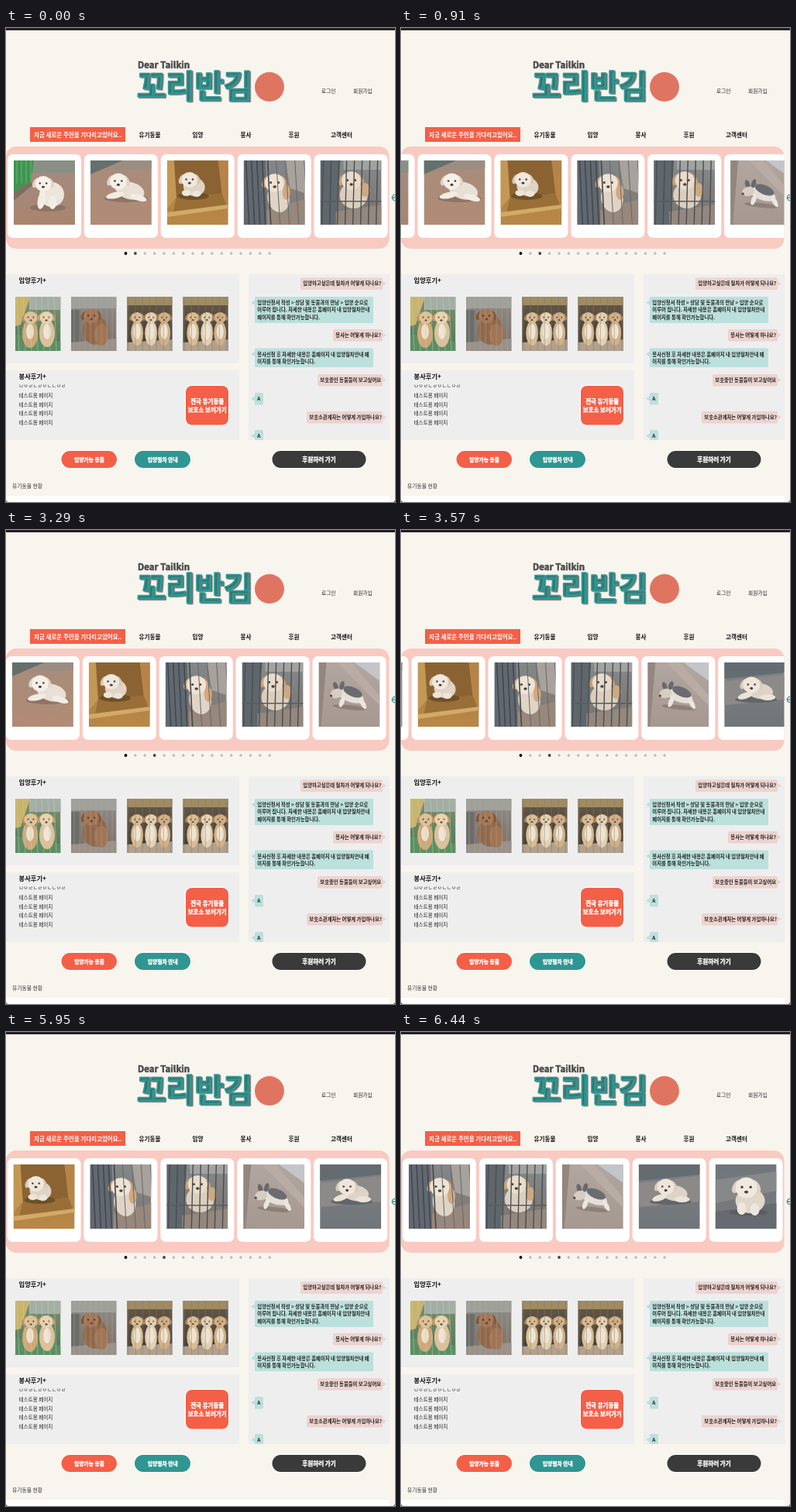
These frames come from a looping animation (502 px wide and 612 px high, 6510 ms). An HTML page with a canvas:

```html
<!DOCTYPE html>
<html lang="ko">
<head>
<meta charset="utf-8">
<style>
html, body { margin: 0; width: 100%; height: 100%; overflow: hidden; background: #f8f4ee; }
canvas { display: block; }
</style>
</head>
<body>
<canvas id="stage" width="502" height="612"></canvas>
<script>
const ctx = document.getElementById('stage').getContext('2d');
const FONT = '"Noto Sans CJK KR", "Noto Sans KR", "Noto Sans CJK JP", "Noto Sans CJK", sans-serif';
const CORAL = '#f45f47', TEAL = '#2f9691', PAGE = '#f8f4ee';
const LOOP = 6510, TICK = 70, SLIDE = 500, PITCH = 98.9;
const SLIDE_STARTS = [660, 3272, 5945];

// ---------- helpers ----------
function rect(color, x, y, w, h) {
  ctx.fillStyle = color;
  ctx.fillRect(x, y, w, h);
}

function rounded(color, x, y, w, h, r) {
  ctx.beginPath();
  ctx.roundRect(x, y, w, h, r);
  ctx.fillStyle = color;
  ctx.fill();
}

// White rim outside the coloured shape
function button(color, x, y, w, h, r) {
  rounded('#fff', x - 1, y - 1, w + 2, h + 2, r + 1);
  rounded(color, x, y, w, h, r);
}

function poly(color, ...pts) {
  ctx.beginPath();
  for (let i = 0; i < pts.length; i += 2) ctx.lineTo(pts[i], pts[i + 1]);
  ctx.fillStyle = color;
  ctx.fill();
}

function blob(color, x, y, rx, ry = rx, turn = 0) {
  ctx.beginPath();
  ctx.ellipse(x, y, rx, ry, turn, 0, Math.PI * 2);
  ctx.fillStyle = color;
  ctx.fill();
}

// y is the vertical middle of the line; weight 900 gets a thin outline for a heavier face
function text(str, x, y, size, weight = 400, color = '#222', align = 'left') {
  ctx.font = `${weight} ${size}px ${FONT}`;
  ctx.textAlign = align;
  ctx.fillStyle = color;
  ctx.fillText(str, x, y + size * 0.37);
  if (weight < 900) return;
  ctx.strokeStyle = color;
  ctx.lineJoin = 'round';
  ctx.lineWidth = size * 0.05;
  ctx.strokeText(str, x, y + size * 0.37);
}

function shade(w, h, top, bottom) {
  const g = ctx.createLinearGradient(0, 0, 0, h);
  g.addColorStop(0, top);
  g.addColorStop(1, bottom);
  rect(g, 0, 0, w, h);
}

function bars(color, from, to, gap, h, width = 1.3, lean = 0) {
  ctx.strokeStyle = color;
  ctx.lineWidth = width;
  ctx.beginPath();
  for (let x = from; x <= to; x += gap) {
    ctx.moveTo(x, 0);
    ctx.lineTo(x + lean, h);
  }
  ctx.stroke();
}

function head(x, y, r, coat, ear) {
  blob(ear, x - r * 0.9, y - r * 0.1, r * 0.35, r * 0.65, 0.5);
  blob(ear, x + r * 0.9, y - r * 0.1, r * 0.35, r * 0.65, -0.5);
  blob(coat, x, y, r, r * 0.95);
  blob('#4a3f3a', x - r * 0.4, y - r * 0.05, r * 0.12);
  blob('#4a3f3a', x + r * 0.4, y - r * 0.05, r * 0.12);
  blob('#4a3f3a', x, y + r * 0.4, r * 0.18, r * 0.14);
}

function photo(paint, x, y, w, h) {
  ctx.save();
  ctx.beginPath();
  ctx.rect(x, y, w, h);
  ctx.clip();
  ctx.translate(x, y);
  paint(w, h);
  ctx.restore();
}

// ---------- carousel pictures, 79 x 83 ----------
function sittingPup(w, h) {
  shade(w, h, '#a38c80', '#a9846f');
  rect('#8a8f86', 0, 0, w, 16);
  poly('#3f9450', 0, 0, 26, 0, 22, 27, 0, 42);
  bars('#63b06c', 4, 24, 6, 30);
  poly('#7e6d62', 0, 42, 22, 27, 24, 32, 0, 52);
  blob('#8d7365', 44, 61, 23, 5);
  blob('#ece5dc', 49, 44, 16, 16);
  blob('#f3ede5', 36, 51, 5, 12, 0.2);
  blob('#f3ede5', 50, 54, 5, 9);
  head(38, 30, 10.5, '#f6f1e9', '#e0d3c3');
}

function lyingPup(w, h) {
  shade(w, h, '#a78c7c', '#b18b75');
  poly('#65706d', 0, 0, 42, 0, 0, 18);
  poly('#9b8d82', 42, 0, w, 0, w, 10, 20, 13);
  blob('#8f7464', 46, 49, 28, 5);
  blob('#e8e0d6', 51, 39, 19, 11, 0.25);
  blob('#f2ece3', 32, 45, 12, 4, -0.2);
  blob('#f2ece3', 62, 48, 11, 4, 0.3);
  head(36, 27, 11, '#f5efe7', '#e0d3c3');
}

function boxedPup(w, h) {
  shade(w, h, '#a67b42', '#b98848');
  poly('#8b6332', 9, 0, 66, 0, 71, 43, 12, 48);
  poly('#996f37', 12, 48, 71, 43, 79, 62, 7, 71);
  poly('#c39855', 0, 0, 9, 0, 12, 48, 0, 62);
  poly('#b68447', 66, 0, 79, 0, 79, 62, 71, 43);
  poly('#d2aa68', 0, 67, 79, 57, 79, 62, 0, 73);
  blob('#6f5027', 34, 46, 20, 5);
  blob('#dfd4c5', 35, 34, 14, 12, 0.2);
  blob('#ede5d9', 25, 42, 6, 4);
  blob('#ede5d9', 38, 43, 6, 4);
  head(29, 25, 10.5, '#f0e8dc', '#d9c8b2');
}

function cagedPup(w, h) {
  shade(w, h, '#838689', '#81776f');
  poly('#626870', 0, 0, 28, 0, 30, h, 0, h);
  poly('#a8a29c', 54, 0, w, 0, w, 42, 60, 36);
  poly('#98877b', 30, 64, w, 50, w, h, 30, h);
  blob('#e0d4c5', 45, 49, 14, 18, -0.2);
  blob('#d3a980', 55, 41, 5, 10);
  head(40, 29, 12.5, '#efe3d4', '#cfa47b');
  bars('#42484f', 3, 32, 7, h, 1.6, 4);
  bars('#62686e', 42, 78, 12, h, 1, 5);
}

function pupBehindBars(w, h) {
  shade(w, h, '#858a8c', '#7b716a');
  poly('#5f666c', 0, 0, 26, 0, 20, h, 0, h);
  rect('#a2a3a0', 30, 0, 49, 12);
  poly('#94877d', 20, 66, w, 57, w, h, 20, h);
  blob('#dccebd', 43, 45, 18, 17);
  blob('#cca981', 58, 38, 6, 9);
  head(40, 26, 12.5, '#eadccb', '#c9a077');
  bars('#484e53', 4, 79, 10, h, 1.4, -2);
  rect('#575d61', 0, 52, w, 1.5);
}

function runningDog(w, h) {
  shade(w, h, '#b1a6a0', '#a59890');
  poly('#c4c5c8', 46, 0, w, 0, w, 24);
  poly('#93867e', 0, 0, 10, 0, 3, h, 0, h);
  poly('#b9aca4', 24, 0, 42, 0, 79, 43, 79, 56);
  blob('#8d8078', 40, 58, 22, 3, 0.1);
  blob('#e5dfd8', 41, 43, 18, 8, 0.35);
  blob('#6b6b70', 44, 38, 13, 6, 0.4);
  blob('#ece6df', 57, 53, 3, 8, -0.5);
  blob('#ece6df', 30, 51, 3, 7, 0.4);
  blob('#69686c', 22, 31, 3, 6, -0.3);
  blob('#69686c', 30, 30, 3, 6, 0.3);
  blob('#d8cdc2', 23, 40, 8, 6, -0.3);
  blob('#484443', 16, 43, 1.6);
}

function rockPup(w, h) {
  shade(w, h, '#7f8284', '#70757a');
  poly('#646b71', 0, 0, w, 0, w, 13, 0, 21);
  poly('#8b8a88', 0, 24, w, 15, w, 48, 0, 55);
  blob('#62656a', 41, 48, 27, 4);
  blob('#ddd3c6', 46, 37, 17, 10, 0.15);
  blob('#ebe3d8', 27, 43, 10, 4, -0.3);
  blob('#ebe3d8', 56, 45, 10, 4);
  head(35, 29, 11, '#eee6db', '#d9ccbc');
}

function fluffyPup(w, h) {
  shade(w, h, '#70777c', '#777a7c');
  poly('#87888a', 0, 20, w, 9, w, 34, 0, 50);
  poly('#656b70', 0, 61, w, 50, w, h, 0, h);
  blob('#595d61', 43, 62, 25, 4);
  blob('#e0d7cb', 45, 47, 19, 16);
  blob('#eee7dd', 34, 57, 6, 8);
  blob('#eee7dd', 51, 58, 6, 8);
  head(40, 30, 14, '#f0e9df', '#ded2c4');
}

const slides = [sittingPup, lyingPup, boxedPup, cagedPup, pupBehindBars, runningDog, rockPup, fluffyPup];

// ---------- review pictures, 59 x 70 ----------
function goldenPair(w, h) {
  shade(w, h, '#7d8f72', '#4e7a55');
  poly('#c9b46b', 0, 0, 19, 0, 7, 36, 0, 38);
  rect('#a3aea5', 18, 0, 41, 17);
  poly('#5c8f63', 0, 48, w, 58, w, h, 0, h);
  blob('#cfa877', 19, 48, 10, 18);
  blob('#dcc09a', 41, 47, 10, 18);
  blob('#ece0cb', 19, 45, 5, 10);
  blob('#efe5d4', 41, 45, 5, 10);
  head(20, 27, 8.5, '#e0c195', '#b98b58');
  head(40, 27, 8.5, '#ebd3ae', '#c39b69');
  bars('#c3cbb8', 2, 59, 8, h, 0.5, 3);
}

function brownPoodle(w, h) {
  shade(w, h, '#8f8d88', '#7c7067');
  rect('#a0a09b', 0, 0, w, 15);
  rect('#6c6d68', 0, 17, 12, 42);
  poly('#99918a', 0, 59, w, 54, w, h, 0, h);
  blob('#92684a', 31, 43, 16, 19);
  blob('#a27453', 39, 49, 9, 14);
  head(26, 25, 10, '#a67552', '#835539');
  bars('#a9a49b', 4, 59, 7, h, 0.5);
}

function threeDogs(w, h) {
  shade(w, h, '#665a49', '#3f3831');
  rect('#a08b63', 0, 0, w, 11);
  poly('#b1a18e', 0, 59, w, 55, w, h, 0, h);
  for (const [x, coat] of [[13, '#d9bd94'], [31, '#e4d0b3'], [48, '#d2b088']]) {
    blob(coat, x, 47, 8, 16);
    blob('#eee4d3', x, 45, 4.5, 10);
    head(x, 27, 7.5, coat, '#a9835a');
  }
  bars('#827b6c', 2, 59, 9, h, 0.5);
}

// ---------- page sections ----------
function header() {
  rect(PAGE, 0, 0, 502, 612);
  rect('#261e27', 0, 0, 502, 3);
  text('Dear Tailkin', 170, 47.5, 11.5, 900, '#4c4c4c');
  ctx.shadowColor = 'rgba(70,70,70,.65)';
  ctx.shadowOffsetX = ctx.shadowOffsetY = 1.5;
  ctx.shadowBlur = 1;
  text('꼬리반김', 169, 75, 40.5, 900, TEAL);
  ctx.shadowColor = 'transparent';
  blob('#df7561', 340, 76, 19);

  text('로그인', 407, 82, 6.7);
  text('회원가입', 448, 82, 6.7);

  rect(CORAL, 31, 128, 123, 19);
  text('지금 새로운 주인을 기다리고있어요..', 36, 138, 7.5, 700, '#fff');
  const menu = { 유기동물: 171.5, 입양: 240.5, 봉사: 302.5, 후원: 364.5, 고객센터: 419 };
  for (const [label, x] of Object.entries(menu)) text(label, x, 138, 7.6, 700, '#111');
}

function carousel(position, active) {
  ctx.save();
  ctx.beginPath();
  ctx.roundRect(0, 153, 494.5, 132, 13);
  ctx.clip();
  rect('#f9cac1', 0, 153, 495, 132);
  slides.forEach((paint, i) => {
    const x = (i - position) * PITCH;
    if (x < -PITCH || x > 495) return;
    rounded('#fff', x + 2, 163, 95, 108, 7);
    photo(paint, x + 10, 171, 79, 83);
  });
  ctx.restore();

  for (let i = 0; i < 16; i++) {
    const color = i === 0 ? '#000' : i === active ? '#444' : '#bebbb8';
    blob(color, 154.5 + i * 12.38, 291, i === 0 || i === active ? 1.9 : 1.8);
  }

  ctx.strokeStyle = TEAL;
  ctx.lineWidth = 1.3;
  ctx.beginPath();
  ctx.arc(502, 219, 3.7, 0, Math.PI * 2);
  ctx.moveTo(499, 219);
  ctx.lineTo(502, 219);
  ctx.stroke();
}

function reviews() {
  rect('#eee', 0, 318, 301, 115);
  rect('#eee', 0, 442, 301, 90);
  text('입양후기+', 16.5, 326, 8.3, 700, '#111');
  [goldenPair, brownPoodle, threeDogs, threeDogs].forEach((paint, i) =>
    photo(paint, 12 + i * 72.1, 347, 58.5, 70));

  text('봉사후기+', 16.5, 450, 8.3, 700, '#111');
  ctx.save();
  ctx.beginPath();
  ctx.rect(0, 460.5, 225, 72);
  ctx.clip();
  text('ㅁㅇㄹㄴㄹㅇㄴㄴㅇㄹ', 16.5, 462, 6.6, 500);
  for (let i = 0; i < 4; i++) text('테스트용 페이지', 16.5, 474.7 + i * 11.6, 6.6, 500);
  ctx.restore();

  button(CORAL, 232, 462, 55, 50.5, 8);
  text('전국 유기동물', 259.7, 482, 7.5, 900, '#fff', 'center');
  text('보호소 보러가기', 259.7, 493, 7.5, 900, '#fff', 'center');
}

function question(str, x, y) {
  rounded('#edd3cf', x, y, 486 - x, 15.5, 2);
  poly('#edd3cf', 486, y + 4.5, 491, y + 7.5, 486, y + 10.5);
  text(str, x + 3.3, y + 7.5, 6.35, 700);
}

function answer(lines, y, w, h) {
  rounded('#bce0dc', 321, y, w, h, 1.5);
  poly('#bce0dc', 321, y + 4.5, 316, y + 7.5, 321, y + 10.5);
  lines.forEach((line, i) => text(line, 324.3, y + 8 + i * 9.1, 6.35, 700));
}

function chat() {
  rect('#eee', 313, 318, 182, 214);
  question('입양하고싶은데 절차가 어떻게 되나요?', 380, 322.5);
  answer(['입양신청서 작성 > 상담 및 동물과의 만남 > 입양 순으로',
    '이루어 집니다. 자세한 내용은 홈페이지 내 입양절차안내',
    '페이지를 통해 확인가능합니다.'], 347, 153, 34);
  question('봉사는 어떻게 하나요?', 422, 389);
  answer(['봉사신청 후 자세한 내용은 홈페이지 내 입양절차안내 페',
    '이지를 통해 확인가능합니다.'], 413.5, 153, 24.5);
  question('보호중인 동물들이 보고싶어요', 402, 447);
  answer(['A'], 471, 11, 15.5);
  question('보호소관계자는 어떻게 가입하나요?', 388, 495);
  answer(['A'], 519, 11, 13);
}

function footer() {
  button(CORAL, 71.5, 546, 71.5, 22, 11);
  text('입양가능 동물', 107.5, 557.5, 6.8, 900, '#fff', 'center');
  button(TEAL, 166, 546, 72, 22, 11);
  text('입양절차 안내', 202.2, 557.5, 6.8, 900, '#fff', 'center');
  button('#3a3a3a', 343.5, 546, 121, 22, 11);
  text('후원하러 가기', 404, 557.5, 7.6, 900, '#fff', 'center');
  text('유기동물 현황', 8, 591.5, 6.8, 400, '#333');
  rect('#fffefd', 0, 604, 495, 8);
  poly('#4a454b', 0, 610, 2, 612, 0, 612);
  poly('#4a454b', 502, 610, 500, 612, 502, 612);
}

// ---------- motion ----------
// The CSS "ease" curve, cubic-bezier(.25, .1, .25, 1)
function ease(x) {
  if (x <= 0) return 0;
  if (x >= 1) return 1;
  const bezier = (a, b, u) => 3 * a * u * (1 - u) ** 2 + 3 * b * u * u * (1 - u) + u ** 3;
  let low = 0, high = 1;
  for (let i = 0; i < 24; i++) {
    const mid = (low + high) / 2;
    if (bezier(0.25, 0.25, mid) < x) low = mid;
    else high = mid;
  }
  return bezier(0.1, 1, low);
}

function draw(now) {
  const t = Math.floor((now % LOOP) / TICK) * TICK;
  const position = SLIDE_STARTS.reduce((sum, start) => sum + ease((t - start) / SLIDE), 0);
  const active = 1 + SLIDE_STARTS.filter(start => t >= start).length;
  header();
  carousel(position, active);
  reviews();
  chat();
  footer();
}

let origin;
function tick(now) {
  origin ??= now;
  draw(Math.max(0, now - origin));
  requestAnimationFrame(tick);
}
draw(0);
requestAnimationFrame(tick);
</script>
</body>
</html>
```
